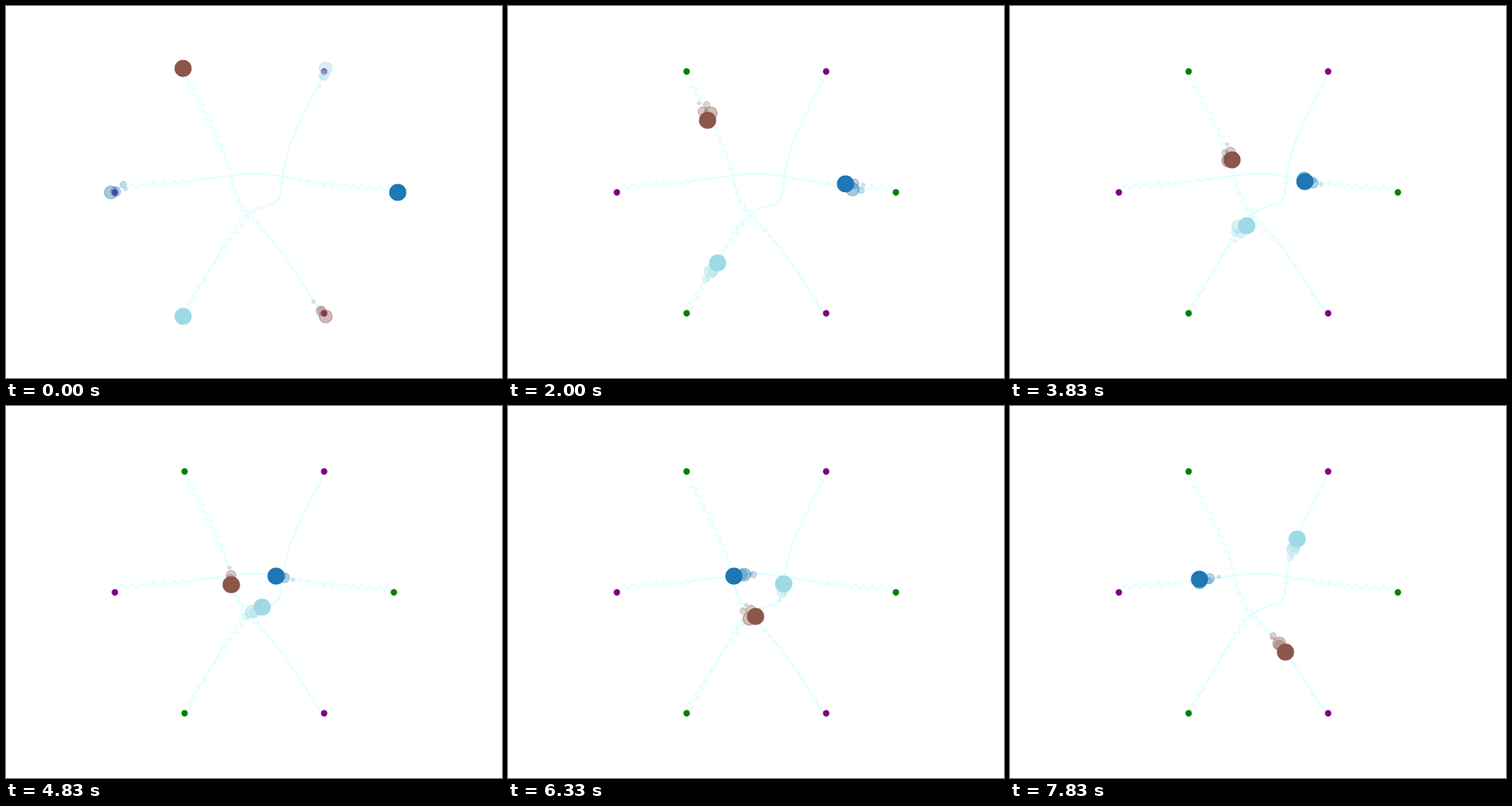
Recreate the animation shown at these times as an HTML page with a canvas. Size 640 by 480 pixels, loop 8 s.

```html
<!DOCTYPE html>
<html lang="en">
<head>
<meta charset="utf-8">
<title>Three agents crossing</title>
<style>
  html, body { margin: 0; width: 100%; height: 100%; overflow: hidden; background: #fff; }
  canvas { display: block; }
</style>
</head>
<body>
<canvas id="stage" width="640" height="480"></canvas>
<script>
const ctx = document.getElementById('stage').getContext('2d');
const { PI, sin, cos, tanh, min, round } = Math;
const PX = 100 / 72; // pixels per point
const CENTER = [320, 240], START_RADIUS = 184.6, GOAL_RADIUS = 180;
const STEPS_PER_LOOP = 48, LAST_STEP = 63, MEETING_STEP = 33, SWAY = 4;

// swell, rise, fall: sideways detour at the meeting and how gradually it comes and goes
// lag, gain: slowing and early lead along the way
// sway: direction in degrees, relative to the heading, turning around one step
const agents = [
  { color: '#1f77b4', start: 0, swell: 23.5, rise: 15, fall: 18, lag: 11, gain: 4,
    sway: { middle: 5, turn: 100, step: 33, width: 35 } },
  { color: '#8c564b', start: 4 * PI / 3, swell: 23.5, rise: 9.5, fall: 11, lag: 6.5, gain: 6,
    sway: { middle: -50, turn: 147, step: 32, width: 10 } },
  { color: '#9edae5', start: 2 * PI / 3, swell: 32, rise: 4, fall: 9, lag: 2.5, gain: 8.5,
    sway: { middle: -65, turn: 130, step: 20, width: 12 } }
];

// Every agent crosses the ring, sways to alternate sides and gives way to its right
function position({ start, swell, rise, fall, lag, gain, sway }, step) {
  const s = step / LAST_STEP;
  const ramp = min(1, step / 2, (LAST_STEP - step) / 2);
  const offset = step - MEETING_STEP;
  const detour = swell / (1 + (offset / (offset < 0 ? rise : fall)) ** 2);
  const angle = (sway.middle - sway.turn * tanh((step - sway.step) / sway.width)) * PI / 180;
  const reach = step % 2 ? -SWAY : SWAY;

  const along = START_RADIUS * (2 * s - 1) - lag * sin(PI * s) + gain * sin(2 * PI * s)
    + ramp * reach * cos(angle);
  const across = ramp * (detour + reach * sin(angle));
  const forward = [-cos(start), -sin(start)];
  return [
    CENTER[0] + along * forward[0] - across * forward[1],
    CENTER[1] + along * forward[1] + across * forward[0]
  ];
}

for (const agent of agents) {
  agent.path = Array.from({ length: LAST_STEP + 1 }, (_, step) => position(agent, step));
}

// Markers sit on pixel centres
function marker([x, y], size, color, alpha = 1) {
  ctx.globalAlpha = alpha;
  ctx.fillStyle = ctx.strokeStyle = color;
  ctx.lineWidth = PX;
  ctx.beginPath();
  ctx.arc(round(x) + .5, round(y) + .5, size * PX / 2, 0, 2 * PI);
  ctx.fill();
  ctx.stroke();
  ctx.globalAlpha = 1;
}

function drawPath(path) {
  ctx.strokeStyle = '#e0ffff';
  ctx.lineWidth = 1.5 * PX;
  ctx.lineJoin = 'round';
  ctx.beginPath();
  path.forEach(([x, y]) => ctx.lineTo(x, y));
  ctx.stroke();
}

function draw(step) {
  ctx.fillStyle = '#fff';
  ctx.fillRect(0, 0, 640, 480);
  agents.forEach(agent => drawPath(agent.path));
  for (let i = 0; i < 6; i++) {
    const angle = i * PI / 3;
    const spot = [CENTER[0] + GOAL_RADIUS * cos(angle), CENTER[1] + GOAL_RADIUS * sin(angle)];
    marker(spot, 5, i % 2 ? '#800080' : '#008000');
  }
  for (const { path, color } of agents) {
    // The trail wraps around to the end of the path on the first steps
    for (let age = 4; age > 0; age--) {
      marker(path.at(step - age), 15 - 3 * age, color, .48 - .08 * age);
    }
    marker(path[step], 15, color);
  }
}

function tick() {
  draw(Math.floor(performance.now() % 8000 * .006 + .03) % STEPS_PER_LOOP);
  requestAnimationFrame(tick);
}
tick();
</script>
</body>
</html>
```
